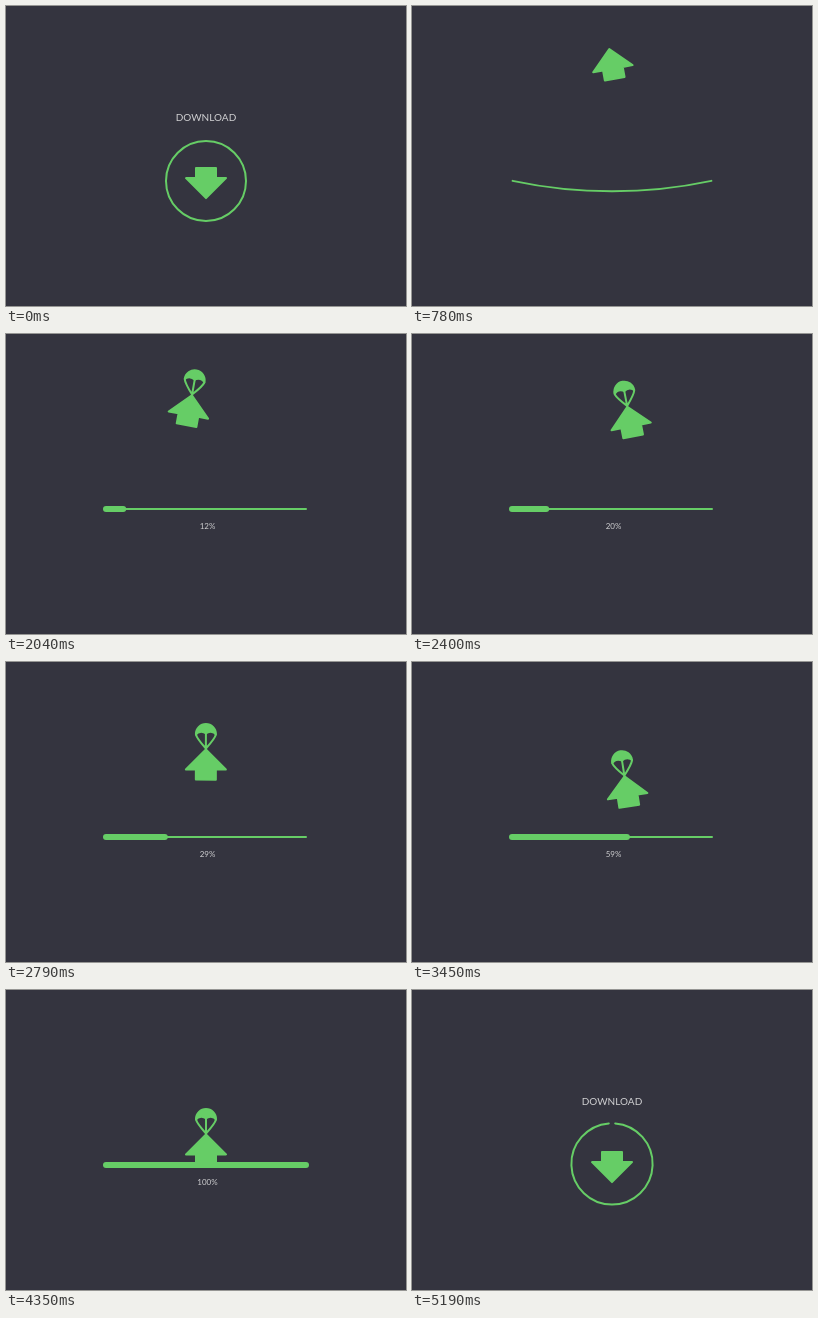
These frames come from a looping animation (400x300 px, 5220 ms). An HTML page:

```html
<!DOCTYPE html>
<html lang="en">
<head>
<meta charset="utf-8">
<title>Download</title>
<style>
  html, body { margin: 0; width: 100%; height: 100%; overflow: hidden; background: #34343f; }
  svg { display: block; width: 100vw; height: 100vh; }
  text { font-family: Lato, sans-serif; fill: #d0d0d2; text-anchor: middle; }
  .line { fill: none; stroke: #66cd66; stroke-linecap: round; stroke-linejoin: round; }
  .solid { fill: #66cd66; }
</style>
</head>
<body>
<svg viewBox="0 0 400 300">
  <defs>
    <clipPath id="above"><rect id="clip" width="400" height="300"/></clipPath>
  </defs>
  <path id="wire" class="line"/>
  <path id="bar" class="line" stroke-width="6"/>
  <g clip-path="url(#above)">
    <g id="arrow">
      <path class="solid" stroke="#66cd66" stroke-width="2" stroke-linejoin="round"
        d="M0 1.4L20 21.4H10V31.6H-10V21.4H-20Z"/>
      <g id="chute">
        <path class="solid" d="M-11 -14A11 11 0 0 1 11 -14L10 -12Q6 -17.5 0 -13.5Q-6 -17.5 -10 -12Z"/>
        <path class="line" stroke-width="2" d="M-10 -13.5Q-9 -9.5 0 0.5Q9 -9.5 10 -13.5M0 -15V1"/>
      </g>
    </g>
  </g>
  <path id="check" class="line" stroke-width="7" pathLength="1" d="M178.5 115L193 129L222.5 96.5"/>
  <text id="title" x="200" y="115" font-size="10">DOWNLOAD</text>
  <text id="percent" x="201.5" y="194.5" font-size="8"></text>
</svg>
<script>
const LOOP = 5220, FLY = 460, APEX = 1010, FILL = 1200, FULL = 4200, RESET = 4930;
const $ = id => document.getElementById(id);
const set = (id, attrs) => {
  for (const k in attrs) $(id).setAttribute(k, attrs[k]);
};
const span = (t, a, b) => Math.min(1, Math.max(0, (t - a) / (b - a)));
const linear = u => u;
const sine = u => (1 - Math.cos(Math.PI * u)) / 2;
const rad = deg => deg * Math.PI / 180;

// Value at t from [time, value] pairs.
function track(t, keys, ease) {
  let value = keys[0][1];
  for (let i = 1; i < keys.length; i++) {
    value += (keys[i][1] - keys[i - 1][1]) * ease(span(t, keys[i - 1][0], keys[i][0]));
  }
  return value;
}

const swing = [[1150, 0], [1980, 11], [2520, -14], [3060, 14], [3600, -14], [4200, 0]];
const height = [[1010, 30], [1250, 30], [1530, 43], [2040, 60], [2610, 78], [2790, 86],
  [3150, 98.5], [3450, 113], [3690, 119], [4350, 143]];
const count = [[FILL, 0], [2040, 12.2], [2790, 29.2], [3450, 59.2], [FULL, 100]];

// An arc hanging at its middle: bend 0 is a flat line, 1 a closed circle.
function arc(bend) {
  if (bend < 0.001) return "M100 175H300";
  const turn = 2 * Math.PI * bend;
  const r = (200 + 51.33 * bend * bend) / turn;
  const low = 175 + 40 * Math.sqrt(bend);
  const dx = r * Math.sin(turn / 2), y = low - r * (1 - Math.cos(turn / 2));
  return `M${200 - dx} ${y}A${r} ${r} 0 0 0 200 ${low}A${r} ${r} 0 0 0 ${200 + dx} ${y}`;
}

function drawWire(t) {
  const closing = t >= RESET;
  const u = span(t, RESET, LOOP);
  const bend = closing ? 1 - (1 - u) ** 1.6 : (1 - span(t, FLY, 1000)) ** 3;
  set("wire", { d: arc(bend), "stroke-width": closing ? 2 + 4 * (1 - span(t, RESET, 5080)) : 2 });

  const fill = span(t, FILL, FULL) ** 1.93;
  set("bar", { d: `M100 175H${100.01 + 200 * fill}`, opacity: t > FILL && !closing ? 1 : 0 });
}

function drawArrow(t) {
  let x, y, angle, scale = 1;
  if (t < APEX || t >= RESET) {
    const u = t < APEX ? span(t, 515, APEX) : 0;
    const mid = 177 - 130.5 * (1 - (1 - u) ** 3.16);
    angle = -180 * (1 - u) ** 3.7;
    x = 200 + 16.5 * Math.sin(rad(angle));
    y = mid - 16.5 * Math.cos(rad(angle));
    if (t >= RESET) {
      scale = sine(span(t, 4950, 5130));
      y = 177 + 16.5 * scale;
    }
  } else {
    angle = track(t, swing, sine);
    x = 200 - 78 * Math.sin(rad(angle));
    y = track(t, height, linear) + 60 * span(t, 4350, 4470) ** 2;
  }
  set("arrow", { transform: `translate(${x} ${y}) rotate(${angle}) scale(${scale})` });
  set("clip", { height: t > 4000 && t < RESET ? 175 : 300 });

  const open = t < RESET ? sine(span(t, 1080, 1350)) : 0;
  set("chute", { transform: `scale(${open})` });
}

function drawCheck(t) {
  const u = sine(span(t, 4430, 4585));
  set("check", {
    "stroke-dasharray": `${u} 2`,
    opacity: u > 0 ? 1 - span(t, RESET, 5010) : 0
  });
}

function drawText(t) {
  set("title", { opacity: t < 2000 ? 1 - span(t, FLY, 600) : span(t, RESET, 5130) });
  const shown = span(t, 1150, 1350);
  set("percent", { y: 197.5 - 3 * shown, opacity: t < RESET ? shown : 0 });
  $("percent").textContent = Math.floor(track(t, count, linear) + 0.001) + "%";
}

function draw(t) {
  drawWire(t);
  drawArrow(t);
  drawCheck(t);
  drawText(t);
}

const start = performance.now();
function tick() {
  draw((performance.now() - start) % LOOP);
  requestAnimationFrame(tick);
}
tick();
</script>
</body>
</html>
```
